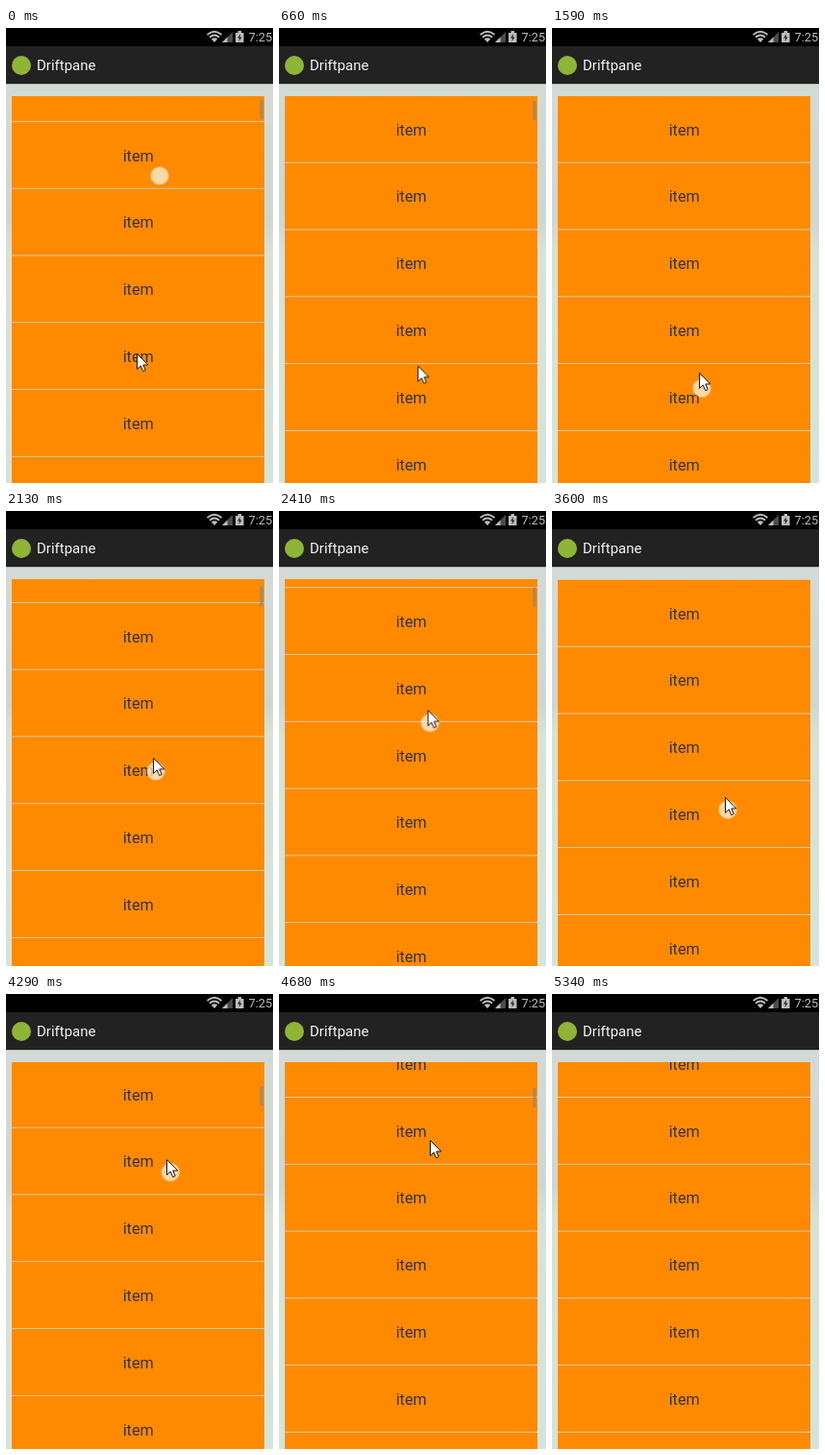
Animation, 278 px wide and 474 px high, one loop 5.44 s. Source, as an HTML page:

```html
<!DOCTYPE html>
<html lang="en">
<head>
<meta charset="utf-8">
<title>Driftpane</title>
<style>
  @property --scroll { syntax: "<number>"; inherits: true; initial-value: 0; }

  html, body { margin: 0; width: 100%; height: 100%; overflow: hidden; background: #d4dfd6; }
  svg {
    display: block; width: 278px; height: 474px;
    font-family: Roboto, "Open Sans", sans-serif;
    animation: scroll 5440ms linear infinite;
  }
  .item { font-size: 16.2px; fill: #333; text-anchor: middle; }
  #rows { transform: translateY(calc(var(--scroll) * -1px)); }
  #bar {
    transform: translateY(calc(var(--scroll) * .058px));
    animation: fade 5440ms linear infinite;
  }
  #arrow { animation: point 5440ms linear infinite, leave 5440ms step-end infinite; }
  /* The touch mark trails the pointer by 65 ms */
  #touch { animation: point 5440ms linear -5375ms infinite, press 5440ms step-end infinite; }

  /* Slow drags, then flings that ease out */
  @keyframes scroll {
    0% { --scroll: 42.8; animation-timing-function: ease-out; }
    9.37%, 29.23% { --scroll: 69.8; }
    39.15% { --scroll: 114.6; }
    44.3% { --scroll: 130; }
    52.02% { --scroll: 271.2; animation-timing-function: ease-out; }
    63.97%, 66.18% { --scroll: 348; }
    76.1% { --scroll: 367; }
    78.86% { --scroll: 419.8; animation-timing-function: ease-out; }
    86.03%, 100% { --scroll: 451.6; }
  }
  @keyframes fade {
    0%, 12%, 32%, 61%, 71%, 89% { opacity: 1; }
    22%, 29.3%, 66%, 68.4%, 98%, 100% { opacity: 0; }
  }
  @keyframes point {
    0% { transform: translate(136px, 339px); }
    5% { transform: translate(139px, 315px); }
    22.6% { transform: translate(152px, 405px); }
    27% { transform: translate(153px, 386px); }
    29.23% { transform: translate(153px, 359px); }
    39.15% { transform: translate(153px, 257px); }
    52.02% { transform: translate(157px, 133px); animation-timing-function: ease-in-out; }
    63.97% { transform: translate(180px, 319px); }
    66.18% { transform: translate(180px, 298px); }
    78.86% { transform: translate(167px, 172px); }
    86%, 99.99% { transform: translate(157px, 152px); }
    100% { transform: translate(136px, 339px); }
  }
  @keyframes press {
    0%, 27%, 63.9% { opacity: 1; }
    7%, 54.2%, 83.2%, 100% { opacity: 0; }
  }
  @keyframes leave {
    0% { opacity: 1; }
    88.78%, 100% { opacity: 0; }
  }
</style>
</head>
<body>
<svg viewBox="0 0 278 474">
  <defs>
    <linearGradient id="sky" x1="0" y1="0" x2="0" y2="1">
      <stop offset="0" stop-color="#d3dad5"/>
      <stop offset=".34" stop-color="#cdd7d0"/>
      <stop offset=".42" stop-color="#d8e1d6"/>
      <stop offset="1" stop-color="#d3e4da"/>
    </linearGradient>
    <clipPath id="view"><rect x="6" y="71" width="263" height="403"/></clipPath>
  </defs>

  <rect y="58" width="278" height="416" fill="url(#sky)"/>

  <g clip-path="url(#view)">
    <rect x="6" y="71" width="263" height="403" fill="#ff8a00"/>
    <g id="rows"></g>
    <rect id="bar" x="264.5" y="72" width="3" height="20" fill="#858585" fill-opacity=".7"/>
  </g>

  <!-- Status bar and action bar -->
  <rect width="278" height="19" fill="#000"/>
  <rect y="19" width="278" height="39" fill="#222"/>
  <rect y="57" width="278" height="1" fill="#181818"/>
  <rect y="58" width="278" height="1" fill="#aeb5b0"/>
  <circle cx="16" cy="39" r="10" fill="#8fb536"/>
  <text x="32" y="44" font-size="15" fill="#f3f3f3">Driftpane</text>
  <g fill="#bdbdbd">
    <g fill="none" stroke="#bdbdbd" stroke-width="1.8">
      <path d="M209.500 7Q217 .5 224.500 7"/>
      <path d="M212 9.700Q217 5.300 222 9.700"/>
    </g>
    <path d="M213.800 11.500Q217 8.800 220.200 11.500L217 15Z"/>
    <path d="M225 15L236 4V15Z" fill="#4c4c4c"/>
    <path d="M225 15L230.500 9.500V15Z"/>
    <path d="M239 5H241.500V3H245V5H247.500V15H239Z"/>
    <path d="M244 6L241 10.500H243L242.500 14L245.500 9.500H243.500Z" fill="#222"/>
    <text x="252.5" y="14" font-size="12.8">7:25</text>
  </g>

  <circle id="touch" cx="3" cy="2" r="9" fill="#fff" fill-opacity=".66"
          stroke="#fff" stroke-opacity=".25" stroke-width="2"/>
  <path id="arrow" d="M.5 .5V16.500L4.200 13L6.700 18.700L9.200 17.600L6.800 12H11.800Z"
        fill="#fff" stroke="#111"/>
</svg>
<script>
const PITCH = 69.8, TOP = 71, COUNT = 13;
let markup = "";
for (let i = 0; i < COUNT; i++) {
  const y = TOP + i * PITCH;
  markup += `<text class="item" x="137.7" y="${y + 40.7}">item</text>
    <rect x="6" y="${y + PITCH - 1}" width="263" height=".9" fill="#d3d2b8"/>`;
}
document.getElementById("rows").innerHTML = markup;
</script>
</body>
</html>
```
